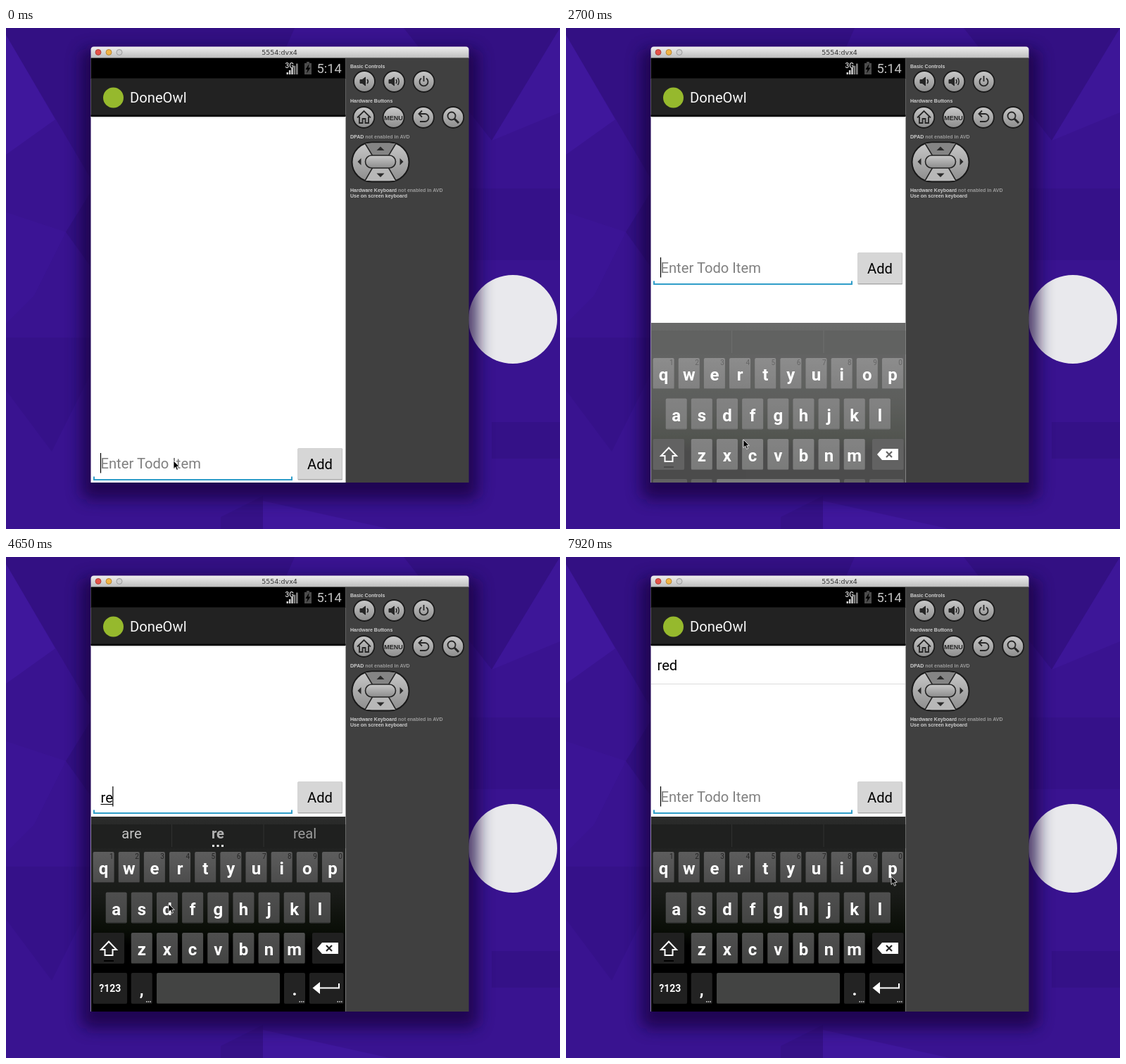
An HTML page for the animation above (8000 ms loop, 787 by 712 pixels).

```html
<!DOCTYPE html>
<html lang="en">
<head>
<meta charset="utf-8">
<title>Adding an item to a list</title>
<style>
html, body { margin: 0; width: 100%; height: 100%; overflow: hidden; background: #391390; }
svg { display: block; }
text { white-space: pre; }
.ui { font-family: Roboto, sans-serif; font-size: 20.2px; }
.panel { font: bold 7px "Liberation Sans", Arial, sans-serif; fill: #cdcdcd; }
.dim { fill: #9b9b9b; }
.key { font: bold 24px Roboto, sans-serif; fill: #fff; text-anchor: middle; }
.mid { text-anchor: middle; }
</style>
</head>
<body>
<svg id="stage" width="787" height="712" viewBox="0 0 787 712">
  <defs>
    <linearGradient id="bar" x2="0" y2="1"><stop stop-color="#efefef"/><stop offset="1" stop-color="#bcbcbc"/></linearGradient>
    <linearGradient id="metal" x2="0" y2="1"><stop stop-color="#c9c9c9"/><stop offset="1" stop-color="#8c8c8c"/></linearGradient>
    <linearGradient id="board" x2="0" y2="1">
      <stop stop-color="#2b2c2b"/><stop offset=".15" stop-color="#222322"/>
      <stop offset=".4" stop-color="#191b18"/><stop offset=".58" stop-color="#0a0e07"/><stop offset=".66" stop-color="#000"/>
    </linearGradient>
    <linearGradient id="cap" x2="0" y2="1"><stop stop-color="#5d5d5d"/><stop offset="1" stop-color="#4c4c4c"/></linearGradient>
    <linearGradient id="lowcap" x2="0" y2="1"><stop stop-color="#4f4f4f"/><stop offset="1" stop-color="#434443"/></linearGradient>
    <filter id="blur" x="-20%" y="-20%" width="140%" height="140%"><feGaussianBlur stdDeviation="11"/></filter>
    <clipPath id="screen"><rect x="121" y="42" width="361.5" height="604"/></clipPath>
  </defs>

  <!-- wallpaper -->
  <rect width="787" height="712" fill="#391390"/>
  <g fill="#331083">
    <path d="M0 0H410L398 27H121V215L0 10Z"/>
    <path d="M565 0H787L690 160Z"/>
    <path d="M85 290L121 232V340Z"/>
    <path d="M657 228H787V330H657Z" opacity=".5"/>
    <path d="M0 515L65 602L121 490V440H0Z" opacity=".5"/>
    <path d="M690 560H787V612H690Z" opacity=".7"/>
    <path d="M305 695L365 665V712H305Z" opacity=".6"/>
  </g>
  <g fill="#3f179c">
    <path d="M0 10L70 130L0 180Z"/>
    <path d="M787 0V120L690 160Z" opacity=".7"/>
    <path d="M0 262L85 290L40 380L0 420Z" opacity=".5"/>
    <path d="M365 672L545 712H365Z"/>
  </g>
  <circle cx="720" cy="414" r="63" fill="#e9e9ed"/>

  <!-- window -->
  <rect x="107" y="30" width="564" height="640" rx="12" fill="#12023c" opacity=".75" filter="url(#blur)"/>
  <path d="M120.500 43V31Q120.500 26.500 125 26.500H653Q657.500 26.500 657.500 31V43Z" fill="url(#bar)"/>
  <path d="M121 42.500H657" stroke="#6b6b6b"/>
  <g stroke-width=".8">
    <circle cx="131" cy="34.500" r="4" fill="#e65349" stroke="#9d342d"/>
    <circle cx="146" cy="34.500" r="4" fill="#f2b545" stroke="#a7772a"/>
    <circle cx="161" cy="34.500" r="4" fill="#cfcfcf" stroke="#8f8f8f"/>
  </g>
  <text x="388.500" y="38" class="mid" font-family="DejaVu Sans, sans-serif" font-size="9.500" fill="#333">5554:dvx4</text>
  <rect x="482" y="43" width="175.500" height="603" fill="#404040"/>
  <rect x="120.500" y="43" width="362" height="603" fill="#fff"/>

  <!-- status and title -->
  <rect x="120.500" y="43" width="362" height="29" fill="#000"/>
  <rect x="120.500" y="71.500" width="362" height="53" fill="#222"/>
  <rect x="120.500" y="123.500" width="362" height="2.500" fill="#000"/>
  <rect x="120.500" y="126" width="362" height="1.500" fill="#d5d5d5"/>
  <g id="signal"></g>
  <text x="396.500" y="57" font-family="Roboto, sans-serif" font-size="10" font-weight="500" fill="#ddd">3G</text>
  <path d="M427 48H431V50H434V66H424V50H427Z" fill="#4b4b4b"/>
  <path d="M430.500 51L425.500 59H428.500L427 64.500L432.500 56.500H429.500Z" fill="#000"/>
  <text x="441.500" y="64" class="ui" style="font-size:18.300px" fill="#c4c4c4">5:14</text>
  <circle cx="152.500" cy="99" r="14.500" fill="#96b92d"/>
  <text x="176" y="106" class="ui" fill="#f6f6f6">DoneOwl</text>

  <!-- emulator controls -->
  <g class="panel">
    <text x="489" y="56.500">Basic Controls</text>
    <text x="489" y="105.500">Hardware Buttons</text>
    <text x="489" y="157">DPAD <tspan class="dim">not enabled in AVD</tspan></text>
    <text x="489" y="232.700">Hardware Keyboard <tspan class="dim">not enabled in AVD</tspan></text>
    <text x="489" y="241.200">Use on screen keyboard</text>
  </g>
  <g id="buttons"></g>
  <g fill="none" stroke="#262626" stroke-width="1.800">
    <path d="M503 73.500H506L510.500 70V82L506 78.500H503Z" fill="#262626" stroke-width="1"/>
    <path d="M513 73Q515.500 76 513 79"/>
    <path d="M544 73.500H547L551.500 70V82L547 78.500H544Z" fill="#262626" stroke-width="1"/>
    <path d="M554 73Q556 76 554 79M556.500 71Q560 76 556.500 81" stroke-width="1.500"/>
    <path d="M590 71.500A6 6 0 1 0 597 71.500M593.500 68V76"/>
    <path d="M499 127.500L508.500 118L518 127.500M502 126V135H506.500V129H510.500V135H515V126"/>
    <path d="M587 122H595A5.500 5.500 0 0 1 595 133H588M591 117.500L586.500 122L591 126.500"/>
    <circle cx="633" cy="125" r="5.500"/>
    <path d="M637 129L643 135" stroke-width="3"/>
  </g>
  <text x="550.500" y="130.500" class="mid" font-family="Liberation Sans, sans-serif" font-weight="bold" font-size="9" fill="#262626">MENU</text>
  <rect x="491.500" y="162.500" width="81" height="56" rx="28" fill="url(#metal)" stroke="#191919" stroke-width="2"/>
  <path d="M510 164L520 181H544L554 164Z" fill="#858585"/>
  <path d="M510 217L520 199H544L554 217Z" fill="#b8b8b8"/>
  <path d="M510 164L521 182M554 164L543 182M510 217L521 198M554 217L543 198" stroke="#242424" stroke-width="1.500"/>
  <rect x="510.500" y="181" width="43" height="18" rx="9" fill="url(#metal)" stroke="#242424" stroke-width="1.600"/>
  <path d="M526.500 174H537.500L532 168.500ZM526.500 206.500H537.500L532 212ZM504.500 185V195L499.500 190ZM559.500 185V195L564.500 190Z" fill="#2b2b2b"/>

  <!-- list entry -->
  <g id="entry">
    <text x="129.500" y="160.500" class="ui">red</text>
    <path d="M121 180.500H482" stroke="#dcdcdc"/>
  </g>

  <!-- input row -->
  <g id="row">
    <text id="hint" x="134.500" y="626" class="ui" fill="#808080">Enter Todo Item</text>
    <text id="typed" x="134.500" y="627" class="ui"></text>
    <path id="under" stroke="#111" stroke-width="1.200"/>
    <path id="caret" d="M0 604V632.500" stroke="#000" stroke-width="1.200"/>
    <path d="M125 637.500V642H406V637.500" fill="none" stroke="#2f9dc9" stroke-width="2"/>
    <rect x="414.500" y="597.500" width="63.500" height="45" rx="1" fill="#aaa"/>
    <rect x="415" y="598" width="62.500" height="43" fill="#d6d6d6"/>
    <text x="446" y="627" class="ui mid">Add</text>
  </g>

  <!-- keyboard -->
  <g clip-path="url(#screen)"><g id="keyboard">
    <rect x="120.500" y="369" width="362" height="277" fill="url(#board)"/>
    <rect x="120.500" y="380" width="362" height="34" fill="#1f201f"/>
    <path d="M235.500 380V412M366 380V412" stroke="#303130"/>
    <g id="keys"></g>
    <g id="words" class="ui mid">
      <text x="178.500" y="400" fill="#c4c4c4"></text>
      <text x="301" y="400" fill="#b0b0b0" font-weight="bold"></text>
      <text x="424.500" y="400" fill="#9c9c9c"></text>
      <path d="M293 410.500H296M299.500 410.500H302.500M306 410.500H309" stroke="#eee" stroke-width="3"/>
    </g>
    <path d="M146 546.500L157 558H151.500V566H140.500V558H135Z" fill="none" stroke="#fff" stroke-width="2"/>
    <path d="M139 574H153" stroke="#000" stroke-width="2"/>
    <path d="M442 556L449 548H472V564H449Z" fill="#fff"/>
    <path d="M455 552L463 560M463 552L455 560" stroke="#222" stroke-width="2.200"/>
    <path d="M435.500 612.500L446 604V621Z" fill="#fff"/>
    <path d="M445 612.500H473V606" fill="none" stroke="#fff" stroke-width="2"/>
  </g></g>

  <path id="mouse" d="M0 0V11.500L2.700 9L4.500 13.300L6.500 12.500L4.700 8.300H8.200Z" fill="#000" stroke="#fff" stroke-width=".8"/>
</svg>

<script>
const $ = id => document.getElementById(id);
const LOOP = 8000, PITCH = 36.15;

function add(parent, tag, attrs, text) {
  const node = document.createElementNS("http://www.w3.org/2000/svg", tag);
  for (const name in attrs) node.setAttribute(name, attrs[name]);
  if (text) node.textContent = text;
  parent.appendChild(node);
  return node;
}

function addKey(x, y, width, label, fill, size = 24) {
  add(keys, "rect", { x, y, width, height: 44, rx: 2, fill });
  add(keys, "path", { d: `M${x + 1} ${y + 43.5}h${width - 2}`, stroke: "#1a1a1a", opacity: .6 });
  if (label) {
    add(keys, "text", { class: "key", x: x + width / 2, y: y + (size < 20 ? 27 : 32), style: `font-size:${size}px` }, label);
  }
}

const keys = $("keys");
[["qwertyuiop", 123.6, 419], ["asdfghjkl", 141.7, 476.5], ["zxcvbnm", 177.8, 534]].forEach(([letters, x, y], row) => {
  [...letters].forEach((letter, i) => addKey(x + i * PITCH, y, 30, letter, row ? "url(#lowcap)" : "url(#cap)"));
});
for (let i = 0; i < 10; i++) {
  add(keys, "text", { x: 147 + i * PITCH, y: 429, fill: "#252525", "font-size": 10, "font-family": "Roboto, sans-serif" }, String((i + 1) % 10));
}
addKey(123.6, 534, 44.5, "", "#202020");
addKey(435, 534, 44.5, "", "#202020");
addKey(123.6, 591, 48.5, "?123", "#202020", 14);
addKey(177.8, 591, 30, ",", "#232323");
addKey(214, 591, 175, "", "#434443");
addKey(395, 591, 30, ".", "#232323");
addKey(431, 591, 48.5, "", "#202020");
for (const x of [199, 416.5, 470.5]) {
  add(keys, "path", { d: `M${x} 632h7`, stroke: "#ddd", "stroke-width": 1.5, "stroke-dasharray": "1.5 1.2" });
}

for (let i = 0; i < 7; i++) {
  const cx = i < 3 ? 509 + i * 42.3 : 508.3 + (i - 3) * 42.3, cy = i < 3 ? 76 : 127;
  add($("buttons"), "circle", { cx, cy, r: 15, fill: "url(#metal)", stroke: "#1b1b1b", "stroke-width": 1.8 });
}

for (let i = 0; i < 5; i++) {
  const height = 3 + i * 3.1;
  add($("signal"), "rect", { x: 398.5 + i * 3.4, y: 66 - height, width: 2.5, height, fill: i < 3 ? "#d0d0d0" : "#858585" });
}

// time, x, y of the pointer tip
const path = [
  [1650, 238, 615], [1950, 231, 614], [2550, 231, 614], [2700, 252, 585], [2850, 283, 543],
  [3000, 274, 500], [3300, 248, 446], [3600, 246, 441], [3750, 240, 441], [4050, 210, 440],
  [4200, 211, 441], [4350, 229, 497], [4650, 231, 493], [4940, 232, 494], [5240, 421, 345],
  [5390, 423, 340], [5540, 418, 319], [5840, 430, 284], [6130, 430, 290], [6730, 446, 526],
  [6880, 446, 524], [7320, 452, 490], [7770, 462, 454]
];

const typing = [[0, ""], [3600, "r"], [4200, "re"], [4790, "red"], [5390, ""]];
const suggestions = [[0, ""], [4500, "are re real"], [4940, "reduced red read"], [5840, ""]];
const caretOff = [[300, 750], [1200, 1800], [2550, 2700], [3150, 3600], [5840, 6430], [6880, 7320]];

const latest = (list, t) => list.filter(step => step[0] <= t).pop()[1];

function tick(t) {
  if (t < 4650) return Math.floor(t / 150) * 150;
  const r = (t - 4650) % 1190;
  return t - r + (r < 140 ? 0 : 140 + Math.floor((r - 140) / 150) * 150);
}

function pointer(t) {
  const next = path.findIndex(p => p[0] > t);
  if (next === 0) return path[0].slice(1);
  if (next < 0) return path[path.length - 1].slice(1);
  const a = path[next - 1], b = path[next], k = (t - a[0]) / (b[0] - a[0]);
  return [a[1] + (b[1] - a[1]) * k, a[2] + (b[2] - a[2]) * k];
}

const show = (node, on) => node.setAttribute("visibility", on ? "visible" : "hidden");
const move = (node, x, y) => node.setAttribute("transform", `translate(${x} ${y})`);

function draw(time) {
  const t = tick(time);
  const text = latest(typing, t);
  const words = latest(suggestions, t);
  const opening = t < 2850;

  move($("row"), 0, t < 2400 ? 0 : -278);
  move($("keyboard"), 0, opening ? 50 : 0);
  $("keyboard").setAttribute("opacity", opening ? .7 : 1);
  show($("keyboard"), t >= 2700);
  show($("entry"), t >= 5390);

  show($("hint"), !text);
  $("typed").textContent = text;
  const width = text ? $("typed").getComputedTextLength() : 0;
  $("under").setAttribute("d", text ? `M134.500 629.500h${width}` : "M0 0");
  move($("caret"), 134.5 + width, 0);
  show($("caret"), !caretOff.some(([from, to]) => t >= from && t < to));

  const labels = words.split(" ");
  $("words").querySelectorAll("text").forEach((node, i) => { node.textContent = labels[i] || ""; });
  $("words").setAttribute("display", words ? "inline" : "none");

  move($("mouse"), ...pointer(t));
}

function loop() {
  draw(performance.now() % LOOP);
  requestAnimationFrame(loop);
}
loop();
</script>
</body>
</html>
```
